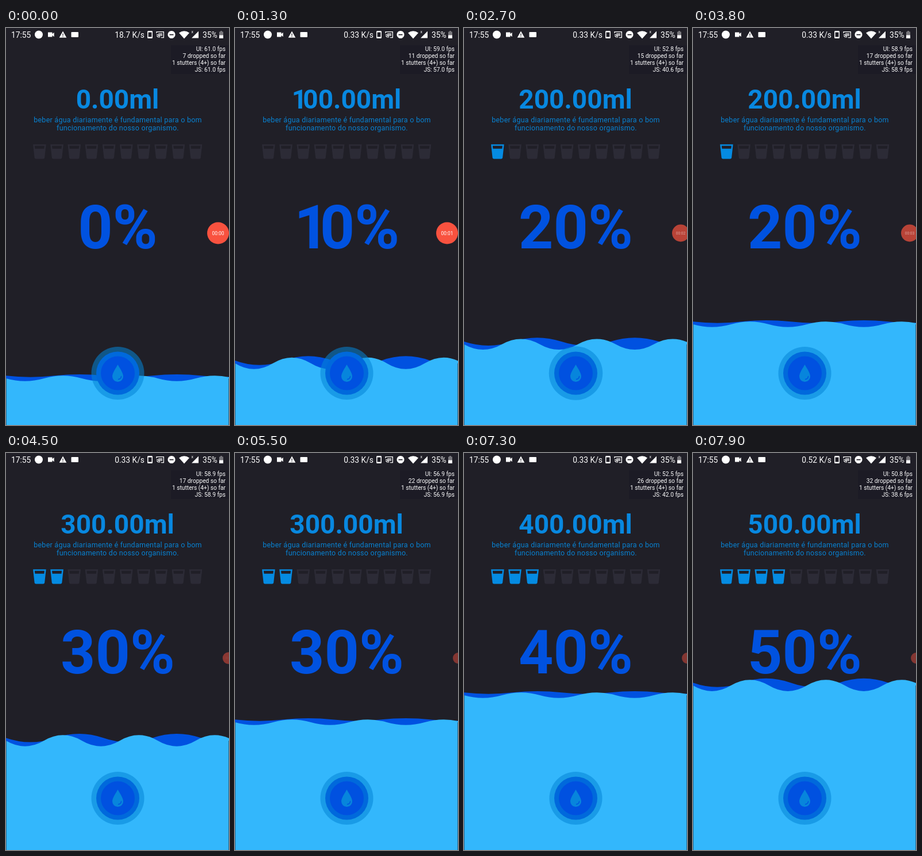
An HTML page that plays this animation: 388x690 px, repeating every 8 s.

```html
<!DOCTYPE html>
<html lang="pt">
<head>
<meta charset="utf-8">
<style>
  html, body { margin: 0; width: 100%; height: 100%; overflow: hidden; background: #201f27; }
  svg { display: block; width: 388px; height: 690px; font-family: Roboto, "Open Sans", sans-serif; }
  .mid { text-anchor: middle; }
  .end { text-anchor: end; }
  .big { font-weight: 700; }
  .one { letter-spacing: -.15em; }
</style>
</head>
<body>
<svg viewBox="0 0 388 690">
  <rect width="388" height="690" fill="#201f27"/>

  <g fill="#fff" font-size="13.8">
    <text x="9" y="17">17:55</text>
    <circle cx="57" cy="11.5" r="7"/>
    <path d="M73 7.5h7.500v2.800l3.200-2.600v7.600l-3.200-2.600v2.800H73z"/>
    <path fill-rule="evenodd" d="M99 5.500l6.300 11.300H92.700zM98.400 9.600v3.600h1.200V9.600zM98.400 14.200v1.300h1.200v-1.300z"/>
    <rect x="113.500" y="7" width="12.500" height="9" rx="1"/>
    <text id="rate" class="end" x="241" y="17"></text>
    <path fill-rule="evenodd" d="M247.500 5h6q1.500 0 1.500 1.500v10q0 1.500-1.500 1.500h-6q-1.500 0-1.500-1.500v-10q0-1.500 1.500-1.500zM247.500 7.500v8h6v-8z"/>
    <g fill="none" stroke="#fff" stroke-width="1.300">
      <path d="M262 9V6.700h12.300v10H270M262 11.300a5.500 5.500 0 0 1 5.500 5.500M262 13.800a3 3 0 0 1 3 3"/>
    </g>
    <rect x="265" y="9" width="7" height="5" opacity=".6"/>
    <path fill-rule="evenodd" d="M288 5a6.500 6.500 0 1 0 .01 0zM284.500 10.700h7v1.700h-7z"/>
    <path d="M301 8.500q9-6.500 18 0l-9 10z"/>
    <path d="M335 5.500v12h-12z"/>
    <text x="322.500" y="9" font-size="7">x</text>
    <text x="342" y="17">35%</text>
    <path d="M371 6.500h2V5h3v1.500h2V13h-7z" fill="#77767b"/>
    <path d="M371 12.500h7V18h-7z"/>
  </g>

  <rect x="287" y="30" width="101" height="50" fill="#1c1b25"/>
  <g fill="#fff" font-size="10.200" class="end">
    <text id="ui" x="382" y="40"></text>
    <text id="dropped" x="382" y="52"></text>
    <text x="382" y="64">1 stutters (4+) so far</text>
    <text id="js" x="382" y="76"></text>
  </g>

  <g class="mid" fill="#0888e0">
    <text id="amount" class="big" x="194" y="140" font-size="46"></text>
    <g font-size="12.500" letter-spacing=".25" fill="#0882d2">
      <text x="194.500" y="163.500">beber água diariamente é fundamental para o bom</text>
      <text x="194.500" y="177.700">funcionamento do nosso organismo.</text>
    </g>
    <text id="percent" class="big" x="194.500" y="382.500" font-size="105.500" fill="#0052e0"></text>
  </g>
  <g id="cups"></g>

  <path id="backWave" fill="#0051e0"/>
  <path id="frontWave" fill="#33b7fc"/>
  <path id="edges" fill="#201f27" opacity=".5"/>

  <g transform="translate(194.500 600)">
    <circle id="halo" fill="#0486d8" opacity=".55"/>
    <circle r="37.500" fill="#0069dc"/>
    <circle r="29.500" fill="#0051e0"/>
    <path fill="#0785dc" d="M0 -15C-4 -8 -9.500 0 -9.500 5.500a9.500 9.500 0 0 0 19 0C9.500 0 4 -8 0 -15z"/>
    <path d="M1 10.500a5 5 0 0 0 5-5" fill="none" stroke="#0051e0" stroke-width="1.400" stroke-linecap="round"/>
  </g>

  <g id="bubble">
    <circle id="disc" r="19" fill="#f9523f"/>
    <text id="clock" class="mid" y="3" font-size="8.400" fill="#fff"></text>
  </g>
</svg>
<script>
const LOOP = 8000, STEP = 100;
const PRESSES = [770, 2340, 4100, 5900, 7475];
const SCALE = 388 / 411.4;
const CUP = "M18.32 8H5.67L5.23 4H18.77M3 2L5 20.23C5.13 21.23 5.97 22 7 22H17C18 22 18.87 21.23 19 20.23L21 2H3Z";

// [from ms, UI fps, dropped, JS fps]
const STATS = [
  [0, "61.0", 7, "61.0"], [900, "59.0", 11, "57.0"], [2400, "52.8", 15, "40.6"],
  [3300, "58.9", 17, "58.9"], [4800, "56.9", 22, "56.9"], [6200, "52.5", 26, "42.0"],
  [7600, "50.8", 32, "38.6"]
];
const RATES = [[0, "18.7 K/s"], [800, "0.33 K/s"], [7500, "0.52 K/s"]];

const $ = id => document.getElementById(id);
const clamp = v => Math.min(1, Math.max(0, v));
const ease = v => (v = clamp(v), v < .5 ? 2 * v * v : 1 - 2 * (1 - v) ** 2);
const mix = (a, b, k) => a + (b - a) * k;
const current = (rows, t) => rows.filter(row => row[0] <= t).pop();
const bounce = (age, half) => ease(1 - Math.abs(age / half - 1));

const cups = Array.from({ length: 10 }, (_, i) => {
  const cup = document.createElementNS("http://www.w3.org/2000/svg", "path");
  cup.setAttribute("d", CUP);
  cup.setAttribute("fill-rule", "evenodd");
  cup.setAttribute("transform", `translate(${43.3 + 30.18 * i} 199.800) scale(1.257)`);
  $("cups").append(cup);
  return cup;
});

function set(id, attrs) {
  for (const name in attrs) $(id).setAttribute(name, attrs[name]);
}

function write(id, text) {
  $(id).textContent = text;
}

function writeNumber(id, text) {
  $(id).innerHTML = text.replace(/^1/, '<tspan class="one">1</tspan>');
}

// half-period and control height are in device units
function wave(y, half, control) {
  const w = half * SCALE;
  let d = `M0 ${y}Q${w / 2} ${y + control * SCALE} ${w} ${y}`;
  for (let x = 2 * w; x < 388 + w; x += w) d += `T${x} ${y}`;
  return d + "V690H0Z";
}

function draw(t) {
  const count = PRESSES.filter(p => p <= t).length;
  const age = count ? t - PRESSES[count - 1] : 1e4;

  write("rate", current(RATES, t)[1]);
  const [, ui, dropped, js] = current(STATS, t);
  write("ui", `UI: ${ui} fps`);
  write("dropped", `${dropped} dropped so far`);
  write("js", `JS: ${js} fps`);

  writeNumber("amount", (count * 100).toFixed(2) + "ml");
  writeNumber("percent", count * 10 + "%");
  cups.forEach((cup, i) => cup.setAttribute("fill", i < count - 1 ? "#058be2" : "#2c2b36"));

  const level = 609 - 47 * PRESSES.reduce((sum, p) => sum + ease((t - p) / 1000), 0);
  const swell = mix(5, 16.5, bounce(age, 500));
  set("backWave", { d: wave(level - 5 * SCALE, 90, swell) });
  set("frontWave", { d: wave(level, 70, swell + 5) });
  set("edges", { d: `M0 ${level}h1V690H0zM387 ${level}h1V690h-1z` });
  set("halo", { r: 46 + 9 * bounce(age, 200) });

  const shrink = ease((t - 1900) / 400), hide = ease((t - 4200) / 400);
  const x = 369 + 8 * shrink + 11.5 * hide;
  const size = (19 - 4 * shrink - 5.5 * hide) / 19;
  set("bubble", { transform: `translate(${x} 356.500) scale(${size})` });
  set("disc", { opacity: 1 - .3 * shrink - .24 * hide });
  set("clock", { opacity: 1 - .5 * shrink - .5 * hide });
  write("clock", "00:0" + Math.floor(t / 1000));
}

const start = performance.now();
function tick() {
  const t = (performance.now() - start) % LOOP;
  draw(Math.floor(t / STEP) * STEP);
  requestAnimationFrame(tick);
}
tick();
</script>
</body>
</html>
```
